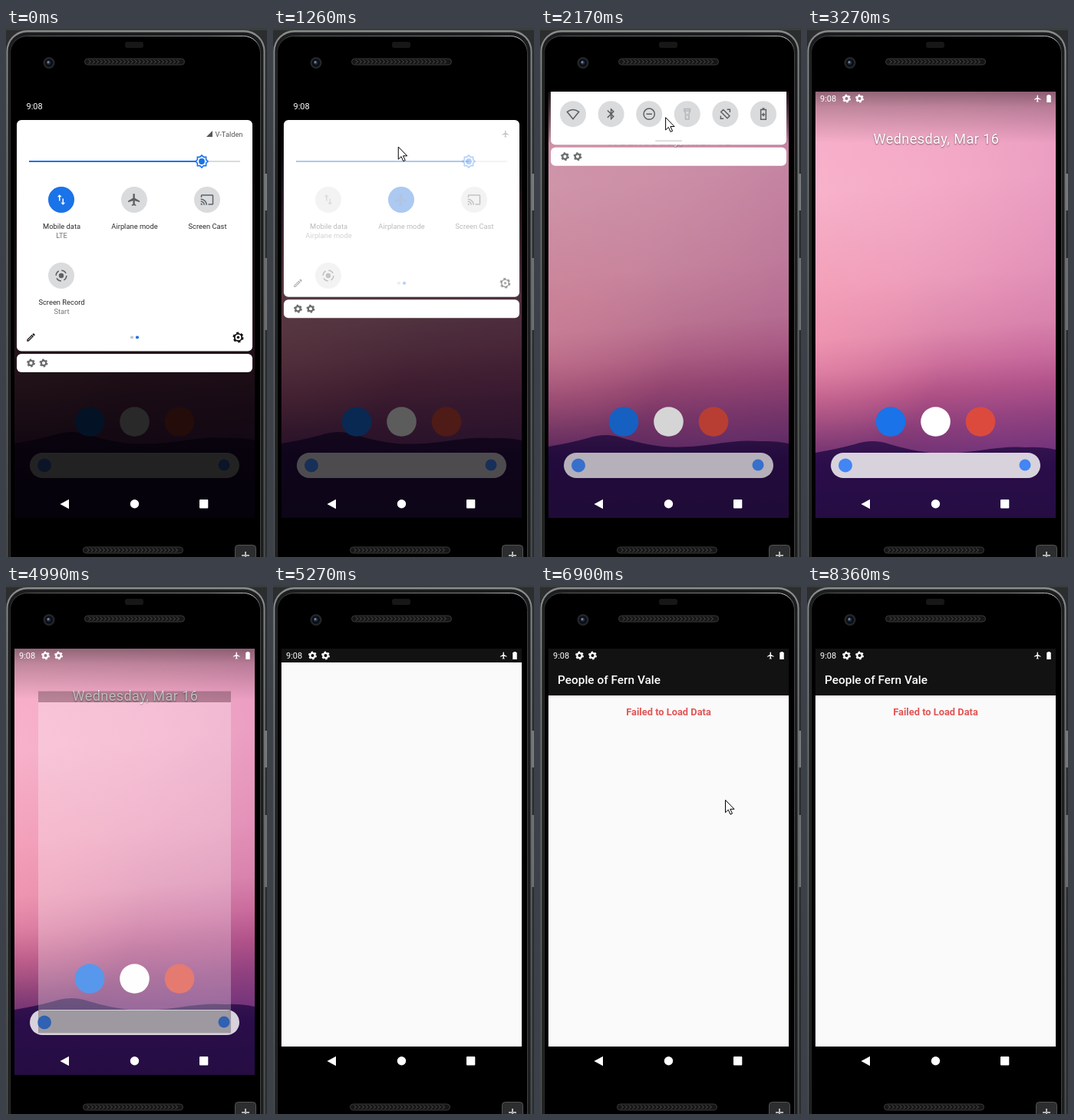
An HTML page with a canvas for the animation above (9.63 s loop, 340 by 690 pixels).

```html
<!DOCTYPE html>
<html lang="en">
<head>
<meta charset="utf-8">
<title>Phone demo</title>
<style>
html, body { margin: 0; width: 100%; height: 100%; overflow: hidden; background: #2b2d2e; }
canvas { display: block; }
</style>
</head>
<body>
<canvas id="stage" width="340" height="690"></canvas>
<script>
const ctx = document.getElementById('stage').getContext('2d');
const LOOP = 9630, STEP = 70;
const SCREEN = [11, 83, 313, 556];
const BLUE = '#1a73e8', GREY = '#dadbdd', INK = '#5f6062';

// ---- timing ----
const STARTS = [7670, 6690, 5950, 4990, 2840, 0];
const quantise = t => {
  const s = STARTS.find(s => t >= s);
  return s + Math.floor((t - s + 12) / STEP) * STEP;
};
// keys: [time, value, value...]; linear between them
function track(t, keys) {
  let i = keys.findIndex(k => k[0] > t);
  if (i < 0) return keys[keys.length - 1].slice(1);
  if (i === 0) return keys[0].slice(1);
  const a = keys[i - 1], b = keys[i], u = (t - a[0]) / (b[0] - a[0]);
  return a.slice(1).map((v, n) => v + (b[n + 1] - v) * u);
}
const clamp = v => Math.max(0, Math.min(1, v));
const mix = (a, b, u) => a + (b - a) * u;

const PATHS = [
  [[70, 305, 647], [210, 262, 500], [350, 205, 318], [490, 173, 236], [630, 168, 228], [1050, 168, 228],
   [1330, 161, 130], [1540, 158, 142], [1820, 158, 158], [1890, 158, 153], [2030, 160, 138],
   [2300, 166, 96], [2640, 169, 86], [2770, 169, 86]],
  [[2770, 169, 86], [2910, 174, 130], [3050, 190, 278], [3200, 218, 526]],
  [[6090, 312, 205], [6230, 290, 232], [6490, 259, 262], [6690, 256, 258], [6760, 250, 255], [6900, 241, 280],
   [7110, 214, 350], [7390, 224, 455], [7600, 227, 497], [7810, 238, 520], [8090, 276, 596], [8300, 311, 671]]
];
const ENDS = [2770, 3250, 8355];

// ---- drawing helpers ----
function inside(alpha, draw) {
  if (alpha <= 0) return;
  ctx.save();
  ctx.globalAlpha *= alpha;
  draw();
  ctx.restore();
}
function rect(x, y, w, h, fill) { ctx.fillStyle = fill; ctx.fillRect(x, y, w, h); }
function round(x, y, w, h, r, fill, stroke, width = 1) {
  ctx.beginPath();
  ctx.roundRect(x, y, w, h, r);
  if (fill) { ctx.fillStyle = fill; ctx.fill(); }
  if (stroke) { ctx.strokeStyle = stroke; ctx.lineWidth = width; ctx.stroke(); }
}
function disc(x, y, r, fill) {
  ctx.beginPath();
  ctx.arc(x, y, r, 0, 7);
  ctx.fillStyle = fill;
  ctx.fill();
}
function text(s, x, y, size, fill, align = 'left', weight = 400, spacing = 0) {
  ctx.font = `${weight} ${size}px Roboto, sans-serif`;
  ctx.letterSpacing = spacing + 'px';
  ctx.textAlign = align;
  ctx.fillStyle = fill;
  ctx.fillText(s, x, y);
}
function addStops(g, stops) {
  stops.forEach(([p, c]) => g.addColorStop(p, c));
  return g;
}
const gradient = (x0, y0, x1, y1, stops) => addStops(ctx.createLinearGradient(x0, y0, x1, y1), stops);

// ---- icons on a 24 unit grid ----
const FILLED = {
  plane: 'M21 16v-2l-8-5V3.5c0-.83-.67-1.5-1.5-1.5S10 2.67 10 3.5V9l-8 5v2l8-2.5V19l-2 1.5V22l3.5-1 3.5 1v-1.5L13 19v-5.5l8 2.5z',
  bluetooth: 'M17.71 7.71L12 2h-1v7.59L6.41 5 5 6.41 10.59 12 5 17.59 6.41 19 11 14.41V22h1l5.71-5.71-4.3-4.29 4.3-4.29zM13 5.83l1.88 1.88L13 9.59V5.83zm1.88 10.46L13 18.17v-3.76l1.88 1.88z',
  cast: 'M21 3H3c-1.1 0-2 .9-2 2v3h2V5h18v14h-7v2h7c1.1 0 2-.9 2-2V5c0-1.1-.9-2-2-2zM1 18v3h3c0-1.66-1.34-3-3-3zm0-4v2c2.76 0 5 2.24 5 5h2c0-3.87-3.13-7-7-7zm0-4v2c4.97 0 9 4.03 9 9h2c0-6.08-4.93-11-11-11z',
  pencil: 'M14.06 9.02l.92.92L5.92 19H5v-.92l9.06-9.06M17.66 3c-.25 0-.51.1-.7.29l-1.83 1.83 3.75 3.75 1.83-1.83c.39-.39.39-1.02 0-1.41l-2.34-2.34c-.2-.2-.45-.29-.71-.29zm-3.6 3.19L3 17.25V21h3.75L17.81 9.94l-3.75-3.75z',
  data: 'M16 17V10h-2v7h-3L15 21l4-4zM9 3L5 7h3v7h2V7h3z',
  battery: 'M9 2h6v2h2.5v18h-11V4H9z',
  signal: 'M2 22L22 2V22z'
};
const STROKED = {
  wifi: 'M1.8 8.2Q12 .5 22.2 8.2L12 20.8z',
  dnd: 'M2.5 12a9.5 9.5 0 1 0 19 0a9.5 9.5 0 1 0 -19 0M7 12h10',
  torch: 'M7 3h10v4l-2 4v10H9V11L7 7zM7 6.5h10M12 12v3',
  rotate: 'M8.5 4.5L19.5 15.5L15.5 19.5L4.5 8.5zM15 4h5v5M9 20H4v-5',
  saver: 'M10 2.5h4M7.5 4.5h9v17h-9zM12 10v6M9 13h6'
};
const shapes = {};
for (const set of [FILLED, STROKED])
  for (const k in set) shapes[k] = new Path2D(set[k]);

function icon(name, x, y, size, color) {
  ctx.save();
  ctx.translate(x - size / 2, y - size / 2);
  ctx.scale(size / 24, size / 24);
  ctx.fillStyle = ctx.strokeStyle = color;
  ctx.lineWidth = 2;
  if (FILLED[name]) ctx.fill(shapes[name]);
  else ctx.stroke(shapes[name]);
  ctx.restore();
}
function ring(x, y, r, width, color, dash = []) {
  ctx.save();
  ctx.beginPath();
  ctx.arc(x, y, r, 0, Math.PI * 2);
  ctx.setLineDash(dash);
  ctx.lineWidth = width;
  ctx.strokeStyle = color;
  ctx.stroke();
  ctx.restore();
}
function gear(x, y, r, color, thin = .42) {
  const tooth = Math.PI * r * .85 / 6;
  ring(x, y, r * (.8 - thin / 2), r * thin, color);
  ring(x, y, r * .85, r * .32, color, [tooth, tooth]);
}
function record(x, y, color) {
  disc(x, y, 3.2, color);
  ring(x, y, 6.8, 1.6, color, [7.1, 3.58]);
}
function tile(x, y, draw, on = 0, ink = INK) {
  disc(x, y, 17, GREY);
  draw(ink);
  inside(on, () => { disc(x, y, 17, BLUE); draw('#fff'); });
}
const iconTile = (name, x, y, size, on, ink) => tile(x, y, c => icon(name, x, y, size, c), on, ink);

// ---- phone body ----
const rim = gradient(0, 0, 0, 690, [[0, '#8a8d8d'], [.3, '#6e7172'], [1, '#4c4f50']]);
const glint = gradient(5, 0, 332, 0, [[0, '#2c2c2c'], [.1, '#5a5a5a'], [.8, '#888'], [.97, '#c8c8c8'], [1, '#3c3c3c']]);

function grille(x, y) {
  round(x, y, 130, 8, 4, '#161616', '#3a3a3a');
  ctx.strokeStyle = '#4c4c4c';
  ctx.beginPath();
  for (let i = x + 5; i < x + 125; i += 5) {
    ctx.moveTo(i, y + 1.5);
    ctx.lineTo(i + 3, y + 4);
    ctx.lineTo(i, y + 6.5);
  }
  ctx.stroke();
}
function phone() {
  rect(0, 0, 340, 690, '#2b2d2e');
  rect(0, 0, 340, 3, '#3a3e3d');
  rect(336.5, 190, 3.5, 48, '#77797a');
  rect(336.5, 300, 3.5, 94, '#6d6f70');
  round(.5, 3, 337, 730, 27, rim);
  round(2.5, 5.5, 333, 730, 25, '#1c1d1e');
  round(5.5, 10.5, 326, 730, 22, '#000', glint);
  round(155, 18, 24, 8, 3, '#171717');
  disc(56, 45.5, 7.5, '#25272a');
  disc(56, 45.5, 5.2, '#0c0f14');
  disc(55.5, 45, 2.6, '#26364f');
  disc(55, 44.5, 1.2, '#8196b4');
  grille(102.5, 40);
  grille(100.5, 677);
  round(298.5, 674.5, 27, 30, 4, '#2c2d2e', '#525354');
  rect(307, 687, 10, 2, '#b5b5b5');
  rect(311, 683, 2, 7, '#b5b5b5');
}

// ---- home screen ----
const sky = gradient(150, 83, 190, 560, [[0, '#f6acc8'], [.25, '#f8b2ca'], [.5, '#f1a5be'], [.65, '#e290ae'],
  [.74, '#cd7098'], [.82, '#ab4d7e'], [.91, '#7c346e'], [1, '#562368']]);
const tint = gradient(11, 200, 324, 300, [[0, '#c86eaa00'], [.45, '#d070aa1c'], [1, '#c060aa48']]);
const glow = addStops(ctx.createRadialGradient(11, 400, 0, 11, 400, 170), [[0, '#ff9cb470'], [1, '#ff9cb400']]);
const shade = gradient(0, 83, 0, 150, [[0, '#00000068'], [.3, '#00000038'], [1, '#00000000']]);
const hills = gradient(0, 540, 0, 639, [[0, '#371550'], [.3, '#2a0d4a'], [1, '#250d42']]);
const ridge = new Path2D('M11 554Q40 549 62 543Q86 535 108 543Q135 551 160 554Q190 556 225 551Q262 545 285 547Q306 546 324 550V660H11z');

function home(rise) {
  ctx.save();
  ctx.translate(0, -rise);
  for (const layer of [sky, tint, glow]) rect(11, 83, 313, 580, layer);
  ctx.fillStyle = hills;
  ctx.fill(ridge);
  ctx.restore();
  rect(...SCREEN, shade);
  inside(1, () => {
    ctx.shadowColor = '#0008';
    ctx.shadowBlur = 2;
    ctx.shadowOffsetY = 1;
    text('Wednesday, Mar 16', 168.4, 151, 18, '#fff', 'center', 400, .47);
  });
  disc(109, 513.5, 19.3, BLUE);
  disc(167.5, 513.5, 19.3, '#fff');
  disc(226, 513.5, 19.3, '#dc4a3d');
  round(31, 554, 273, 33, 16.5, '#d8d2dd');
  disc(50, 570.5, 9, '#4285f4');
  disc(284, 570, 7.5, '#4285f4');
}
function statusBar() {
  text('9:08', 17, 96.3, 11, '#fff');
  gear(51.5, 92, 5.4, '#fff');
  gear(68.5, 92, 5.4, '#fff');
  icon('plane', 300.5, 92, 11, '#fff');
  icon('battery', 315, 92, 12, '#fff');
}
function navigation() {
  ctx.fillStyle = '#fff';
  ctx.fill(new Path2D('M70.5 621L82 614.8V627.2z'));
  disc(167.5, 620.8, 5.7, '#fff');
  round(252, 615, 11.3, 11.5, 1, '#fff');
}

// ---- quick settings ----
const openness = t => track(t, [[1050, 1], [1330, .55], [1540, .14], [1680, 0]])[0];
const liftAt = t => track(t, [[1820, 0], [1890, 5], [2030, 22], [2300, 95], [2590, 165]])[0];
const closing = t => clamp((liftAt(t) - 5) / 160);

function fullSettings(bottom, air) {
  inside(1 - air, () => {
    icon('signal', 265, 138, 9.5, '#555');
    text('V-Talden', 308.5, 141.5, 9.3, '#555', 'right');
  });
  inside(air, () => icon('plane', 303, 138, 11, '#444'));
  rect(30, 173, 275, 2, GREY);
  rect(30, 173, 225, 2, BLUE);
  ctx.beginPath();
  for (let i = 0; i < 16; i++) {
    const r = i % 2 ? 6.1 : 8, a = i * Math.PI / 8;
    ctx.lineTo(255 + r * Math.cos(a), 174 + r * Math.sin(a));
  }
  ctx.closePath();
  ctx.fillStyle = '#fff';
  ctx.strokeStyle = BLUE;
  ctx.lineWidth = 1.6;
  ctx.fill();
  ctx.stroke();
  disc(255, 174, 3.9, BLUE);

  const label = (s, x, y, c = '#2a2b2d') => text(s, x, y, 9.35, c, 'center');
  iconTile('data', 72, 224, 18, 1 - air, '#a8a9ab');
  iconTile('plane', 167, 224, 19, air);
  iconTile('cast', 262, 224, 18, 0);
  tile(72, 323, c => record(72, 323, c));
  label('Mobile data', 72.5, 262);
  label(air > .5 ? 'Airplane mode' : 'LTE', 72.5, 274, '#757575');
  label('Airplane mode', 167.5, 262);
  label('Screen Cast', 262.5, 262);
  label('Screen Record', 72.5, 360.5);
  label('Start', 72.5, 373, '#757575');

  icon('pencil', 32.5, bottom - 18, 14, '#111');
  disc(164, bottom - 18, 2.1, '#c4c6c9');
  disc(171, bottom - 18, 2.1, BLUE);
  gear(302.5, bottom - 18, 7, '#111', .25);
  disc(302.5, bottom - 18, 1.8, '#111');
}
function quickSettings(bottom) {
  text('Wed, Mar 16', 26.5, 141, 9.3, '#4b4c4e');
  icon('plane', 264.5, 138, 11, '#222');
  icon('battery', 279, 137.5, 11, '#3a2440');
  text('100%', 308, 141, 9.5, '#4b4c4e', 'right');
  ['wifi', 'bluetooth', 'dnd', 'torch', 'rotate', 'saver'].forEach((name, i) =>
    iconTile(name, 43 + i * 49.6, 172, 18, 0, name === 'torch' ? '#b4b5b7' : INK));
  round(150, bottom - 6, 35, 2, 1, GREY);
}
function shadePanel(t) {
  const open = openness(t), lift = liftAt(t);
  const air = clamp((t - 630) / 140);
  const bottom = mix(212, 421.5, open);
  rect(...SCREEN, `rgba(0,0,0,${mix(.25, .84, open) * (1 - closing(t))})`);
  inside(clamp((lift - 110) / 50), statusBar);
  ctx.save();
  ctx.translate(0, -lift);
  rect(11, 83, 313, 37, '#000');
  rect(11, 120, 313, 300, gradient(0, 120, 0, bottom, [[0, '#000'], [1, '#0000']]));
  text('9:08', 26.5, 106, 11, '#fff');
  round(14, 120, 307, bottom - 120, 6, '#fff');
  inside(1, () => {
    ctx.beginPath();
    ctx.rect(14, 120, 307, bottom - 120);
    ctx.clip();
    inside(clamp(open * 2 - 1), () => fullSettings(bottom, air));
    inside(clamp(1 - open * 2), () => quickSettings(bottom));
  });
  round(14, bottom + 3.5, 307, 24, 6, '#fff');
  gear(32.5, bottom + 15.5, 5.4, '#6b6c6e');
  gear(49, bottom + 15.5, 5.4, '#6b6c6e');
  ctx.restore();
}

// ---- app ----
function app(t) {
  const u = clamp((t - 4990) / 280);
  const scale = mix(.802, 1, 1 - (1 - u) ** 2);
  inside(mix(.27, 1, clamp(u * 1.8)), () => {
    ctx.translate(167.5, mix(361.5, 361, u));
    ctx.scale(scale, scale);
    ctx.translate(-167.5, -361);
    rect(11, 83, 313, 18, '#121212');
    rect(11, 101, 313, 501, '#fafafa');
    rect(11, 602, 313, 37, '#000');
  });
  if (t < 5950) return;
  rect(11, 101, 313, 43, '#121212');
  rect(11, 144, 313, 3, gradient(0, 144, 0, 147, [[0, '#e2d6da'], [1, '#fafafa']]));
  text('People of Fern Vale', 23, 128.5, 15.4, '#fff', 'left', 500);
  text('Failed to Load Data', 167.5, 170, 12.85, '#e25555', 'center', 700);
}

const arrow = new Path2D('M.5 .5v16.3l3.8-3.6 2.7 6 2.5-1.1-2.7-5.8h5.2z');
function cursor(t) {
  const i = PATHS.findIndex((p, n) => t >= p[0][0] && t < ENDS[n]);
  if (i < 0) return;
  const [x, y] = track(t, PATHS[i]);
  ctx.save();
  ctx.translate(x, y);
  ctx.fillStyle = '#fff';
  ctx.strokeStyle = '#000';
  ctx.lineWidth = 1;
  ctx.fill(arrow);
  ctx.stroke(arrow);
  ctx.restore();
}

function draw(now) {
  const t = quantise((now - start) % LOOP);
  phone();
  ctx.save();
  ctx.beginPath();
  ctx.rect(...SCREEN);
  ctx.clip();
  if (t < 5270) home(12 * (1 - closing(t)));
  if (t < 2640) shadePanel(t);
  else {
    if (t >= 4990) app(t);
    statusBar();
  }
  navigation();
  ctx.restore();
  cursor(t);
  requestAnimationFrame(draw);
}
const start = performance.now();
draw(start);
</script>
</body>
</html>
```
